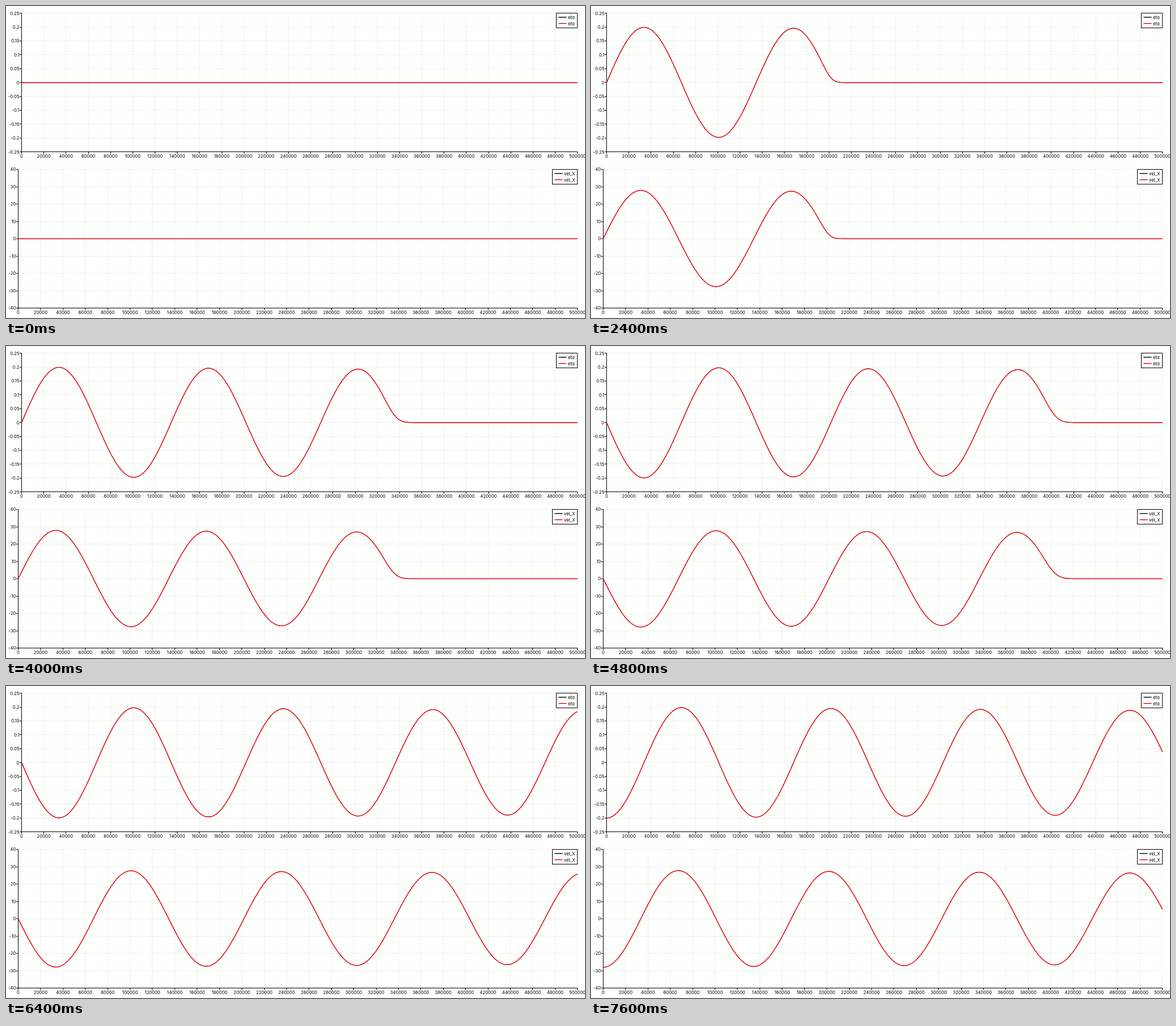
These frames come from a looping animation (1020x549 px, 8 s). An HTML page:

```html
<!DOCTYPE html>
<html lang="en">
<head>
<meta charset="utf-8">
<title>Wave propagation</title>
<style>
  html, body { margin: 0; width: 100%; height: 100%; overflow: hidden; background: #fdfffc; }
  svg { display: block; }
  text { font: 7.75px Inter, "Open Sans", sans-serif; font-feature-settings: "cv11"; fill: #000; }
  .grid { stroke: #f2f3f1; shape-rendering: crispEdges; }
  .axis { stroke: #000; fill: none; shape-rendering: crispEdges; }
  .box { stroke: #000; fill: #fdfffc; shape-rendering: crispEdges; }
  .first, .second { fill: none; stroke-width: 1.4; stroke-linejoin: round; }
  .first { stroke: #000; }
  .second { stroke: #e50012; }
  .hidden { stroke-width: 0.6; }
</style>
</head>
<body>
<svg id="stage" width="1020" height="549" viewBox="0 0 1020 549"></svg>
<script>
const STEP = 400, LOOP = 8000, PERIOD = 1600;
const RIGHT = 1006.75, HEIGHT = 244, X_MAX = 500000;
const WAVELENGTH = 134520, DECAY = 8e6;
const K = 2 * Math.PI / WAVELENGTH;

const charts = [
  { name: "eta", left: 27.5, top: 12.75, max: 0.25, tick: 0.05, amp: 0.2, legendWidth: 37 },
  { name: "vel_X", left: 21.5, top: 287.5, max: 40, tick: 10, amp: 28, legendWidth: 44 }
];
const stage = document.getElementById("stage");

function add(tag, attrs, text) {
  const node = document.createElementNS("http://www.w3.org/2000/svg", tag);
  for (const key in attrs) node.setAttribute(key, attrs[key]);
  if (text !== undefined) node.textContent = text;
  return stage.appendChild(node);
}
const path = (cls, d) => add("path", { class: cls, d });
const label = (x, y, anchor, text) => add("text", { x, y: y + 2.8, "text-anchor": anchor }, text);
const snap = v => Math.floor(v) + 0.5;

function buildChart(c) {
  const bottom = c.top + HEIGHT;
  const xAt = x => c.left + x / X_MAX * (RIGHT - c.left);
  c.yAt = v => c.top + HEIGHT / 2 * (1 - v / c.max);
  let grid = "", axis = `M${c.left} ${snap(c.top)}V${snap(bottom)}H${RIGHT}`;

  for (let x = 0; x <= X_MAX; x += 20000) {
    const px = snap(xAt(x));
    grid += `M${px} ${c.top}V${bottom}`;
    axis += `M${px} ${snap(bottom)}v3.5`;
    label(xAt(x), bottom + 7.2, "middle", x);
  }
  const count = Math.round(c.max / c.tick);
  for (let i = -count; i <= count; i++) {
    const value = +(i * c.tick).toFixed(2), py = snap(c.yAt(value));
    grid += `M${c.left} ${py}H${RIGHT}`;
    axis += `M${c.left} ${py}h-3.5`;
    label(c.left - 4, c.yAt(value) + 0.1, "end", value);
  }
  path("grid", grid);
  path("axis", axis);
  c.lines = [path("first hidden", ""), path("second", "")];

  const boxLeft = snap(RIGHT) - c.legendWidth, boxTop = snap(c.top);
  add("rect", { class: "box", x: boxLeft, y: boxTop, width: c.legendWidth, height: 26 });
  ["first", "second"].forEach((cls, i) => {
    const y = boxTop + 7.2 + i * 11;
    path(cls, `M${boxLeft + 4} ${y}h14`);
    label(boxLeft + 20.5, y, "start", c.name);
  });
}

// Integral of the normal distribution: a ramp with a softened corner.
function softRamp(d, sigma) {
  const z = d / sigma;
  if (z > 5) return d;
  if (z < -5) return 0;
  const a = Math.abs(z), u = 1 / (1 + 0.2316419 * a);
  const pdf = Math.exp(-z * z / 2) / Math.sqrt(2 * Math.PI);
  const tail = pdf * u * (0.31938153 + u * (-0.356563782 + u * (1.781477937
    + u * (-1.821255978 + u * 1.330274429))));
  return sigma * (z * (z > 0 ? 1 - tail : tail) + pdf);
}

// Travelling sine fed in at x = 0; diffusion damps it and widens the front.
function wave(x, t) {
  if (t === 0) return 0;
  const front = t / PERIOD * WAVELENGTH;
  const sigma = Math.sqrt(2 * front / DECAY) / K;
  return Math.exp(-x / DECAY) * Math.sin(K * softRamp(front - x, sigma));
}

function draw(t) {
  const segments = 980;
  for (const c of charts) {
    const points = [];
    for (let i = 0; i <= segments; i++) {
      const s = i / segments;
      const px = c.left + s * (RIGHT - c.left);
      points.push(px.toFixed(2) + " " + c.yAt(c.amp * wave(s * X_MAX, t)).toFixed(2));
    }
    for (const line of c.lines) line.setAttribute("d", "M" + points.join("L"));
  }
}

charts.forEach(buildChart);
draw(0);
const start = performance.now();
let shown = 0;
function tick() {
  const t = Math.floor((performance.now() - start) % LOOP / STEP) * STEP;
  if (t !== shown) draw(shown = t);
  requestAnimationFrame(tick);
}
requestAnimationFrame(tick);
</script>
</body>
</html>
```
